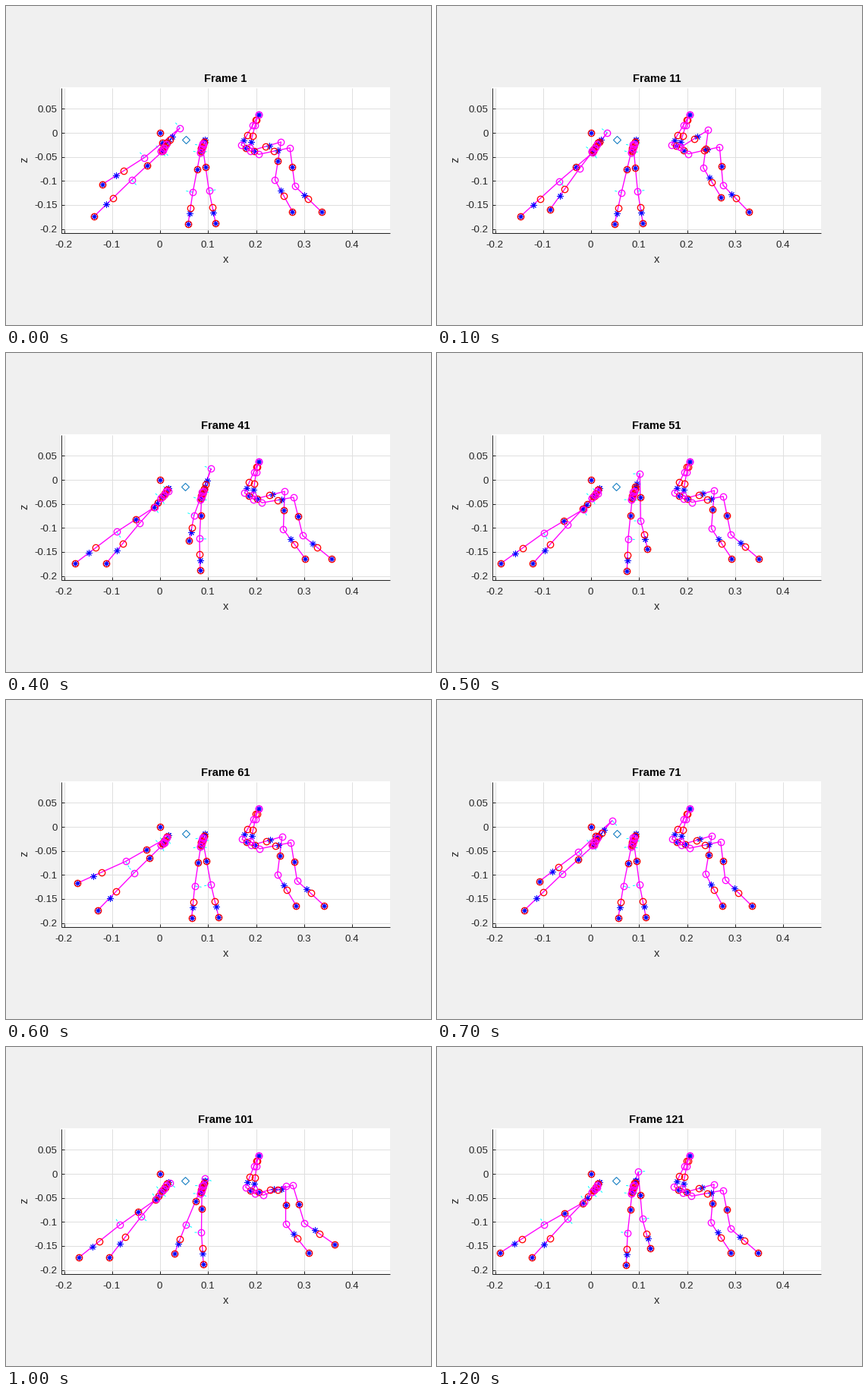
Animation, 560 px wide and 420 px high, one loop 1300 ms. Source, as a matplotlib script:

```python
import numpy as np
import matplotlib.pyplot as plt
from matplotlib.animation import FuncAnimation

W, H, DPI = 560, 420, 100
PX = 72 / DPI                        # points per pixel
PERIOD, SWING = 136, 31              # gait cycle and airborne part, in steps
X0, Y0, UNIT = 202.6, 166.5, 63.3    # plot origin and pixels per 0.1
LEFT, RIGHT, TOP, BOTTOM = 72, 505, 107, 298
INK, GRID = "#262626", "#dfdfdf"
MAGENTA, RED, BLUE, CYAN = "#ff00ff", "#ff0000", "#0000ff", "#00ffff"

plt.rcParams["font.family"] = "Liberation Sans"


class Leg:
    """Joints glide from the landing pose to the lift-off pose, then swing back.

    hip: fixed joints; land, lift: poses of the moving joints;
    bow: sideways bulge while on the ground; arc: bulge while in the air;
    order: place in the wave of steps; turn: side of the small axes.
    """

    def __init__(self, hip, land, lift, bow, arc, order, turn=0, star=0.67):
        self.hip = np.array(hip, float)
        self.land, self.lift, self.arc = (np.array(p, float) for p in (land, lift, arc))
        self.bow = np.array([(b, 0) for b in bow], float)
        self.start = 50.9 + order * PERIOD / 6
        self.turn, self.star = turn, star

    def joints(self, t):
        t = (t - self.start) % PERIOD
        if t < SWING:
            s = t / SWING
            ease = (1 - np.cos(np.pi * s)) / 2 - 0.1 * np.sin(2 * np.pi * s)
            p = (self.lift + (self.land - self.lift) * ease
                 + self.arc * np.sin(np.pi * s) ** 1.3)
        else:
            s = (t - SWING) / (PERIOD - SWING)
            p = (self.land + (self.lift - self.land) * s
                 + self.bow * np.sin(np.pi * s))
        if len(p) == 4:              # the front hip follows the thigh
            x = p[0, 0] - 12
            hip = [*self.hip, (326 + 0.27 * (x - 311), 156.5),
                   (x, 185 + 0.25 * (x - 318))]
        else:
            hip = self.hip
        return np.vstack([hip, p])


LEGS = [
    Leg([(214, 178), (211, 182), (208, 187), (204, 191)],
        land=[(220, 173), (184, 220), (147, 277)],
        lift=[(193, 206), (141, 237), (85, 277)],
        bow=(2, 4.5, 2), arc=[(19, -24), (13, -27), (0, -44)], order=0, turn=1),
    Leg([(262, 176), (260, 182), (258, 188), (256, 193)],
        land=[(259, 181), (271, 243), (281.5, 286)],
        lift=[(258, 185), (238, 246), (224, 287)],
        bow=(0, 0, 2), arc=[(13, -33), (0, -33), (0, -42)], order=-1, turn=-1),
    Leg([(333, 143)],
        land=[(338.5, 197.5), (380, 190.5), (393, 241), (431, 271)],
        lift=[(321.5, 190.5), (362, 178.5), (353, 228.5), (375, 270.5)],
        bow=(0, 0, 0.5, 2.8), arc=[(0, -10), (-9, -35), (-3, -36), (1, -44)],
        order=1, star=0.34),
]


def along(a, b, k):
    return a + (b - a) * k


def marks(j, foot_star):
    """Red ring and blue star positions on one leg."""
    rings = [along(j[k], j[k + 1], 0.5) for k in range(6)] + [j[6]]
    spots = (0, 0.77, 0.5, 0.61, 0.5, foot_star)
    stars = [along(j[k], j[k + 1], f) for k, f in enumerate(spots)] + [j[6]]
    return rings, stars


def stubs(j, sign):
    """Short axes square to the shin."""
    d = j[5] - j[4]
    n = sign * np.array([d[1], -d[0]]) / np.hypot(*d)
    return [(j[k], j[k] + 9 * n) for k in (3, 4, 5)]


fig = plt.figure(figsize=(W / DPI, H / DPI), dpi=DPI, facecolor="#f0f0f0")
ax = fig.add_axes([0, 0, 1, 1])
ax.set_xlim(0, W)
ax.set_ylim(H, 0)
ax.axis("off")
ax.add_patch(plt.Rectangle((LEFT, TOP), RIGHT - LEFT + 1, BOTTOM - TOP,
                           fc="white", ec="none", zorder=0))


def seg(x, y, color, z=1):
    """One-pixel line through pixel centres."""
    ax.plot(np.floor(x) + 0.5, np.floor(y) + 0.5, color=color, lw=PX, zorder=z,
            solid_capstyle="butt")


def label(x, y, s, size, color=INK, ha="center", va="baseline", **kw):
    return ax.text(x, y, s, fontsize=size * PX, color=color, ha=ha, va=va, **kw)


for k in range(-2, 5):
    x = X0 + UNIT * k
    seg([x, x], [TOP, BOTTOM], GRID)
    seg([x, x], [BOTTOM, BOTTOM - 4], INK, 2)
    label(x, 318.5, f"{k / 10:g}", 13.33)
for k in range(-4, 2):
    y = Y0 - UNIT / 2 * k
    seg([LEFT, RIGHT], [y, y], GRID)
    seg([LEFT, LEFT + 4], [y, y], INK, 2)
    label(67.8, y + 5, f"{k / 20:g}", 13.33, ha="right")
seg([LEFT, RIGHT], [BOTTOM, BOTTOM], INK, 2)
seg([LEFT, LEFT], [TOP, BOTTOM], INK, 2)
label(289.4, 338, "x", 14.67)
label(24, 202.5, "z", 14.67, va="center", rotation=90)
title = label(289.4, 100.5, "", 14.67, color="black", weight="bold")


def dots(marker, color, size, weight, z):
    return ax.plot([], [], ls="none", marker=marker, ms=size * PX, mfc="none",
                   mec=color, mew=weight * PX, zorder=z)[0]


small_axes, = ax.plot([], [], color=CYAN, lw=PX, ls=(0, (4, 2)), zorder=3)
bones, = ax.plot([], [], color=MAGENTA, lw=1.35 * PX, zorder=4)
stars = dots((8, 2, 0), BLUE, 8, 1, 5)
rings = dots("o", RED, 8.4, 1.3, 6)
knots = dots("o", MAGENTA, 8.4, 1.3, 7)
center = dots("D", "#0072bd", 6.4, 1, 6)

GAP = (np.nan, np.nan)


def draw(i):
    t = 10 * i + 1
    line, knot, tick = [], [], []
    ring, star = [(203, Y0)], [(203, Y0)]
    for leg in LEGS:
        for side in (0, 1):
            j = leg.joints(t + side * PERIOD / 2)
            r, s = marks(j, leg.star)
            line += [*j, GAP]
            ring += r
            star += s
            knot += list(j[1 if leg.turn else 0:6])
            if leg.turn:
                for a, b in stubs(j, leg.turn * (1 - 2 * side)):
                    tick += [a, b, GAP]
    sway = 237 + 0.5 * np.cos(4 * np.pi * (t - 11) / PERIOD)
    for art, pts in ((bones, line), (rings, ring), (stars, star), (knots, knot),
                     (small_axes, tick), (center, [(sway, 175.5)])):
        x, y = np.array(pts, float).T
        art.set_data(x - 0.4, y)
    title.set_text(f"Frame {t}")
    return bones, rings, stars, knots, small_axes, center, title


anim = FuncAnimation(fig, draw, frames=13, interval=100, repeat=True,
                     repeat_delay=0, blit=False)
plt.show()
```
